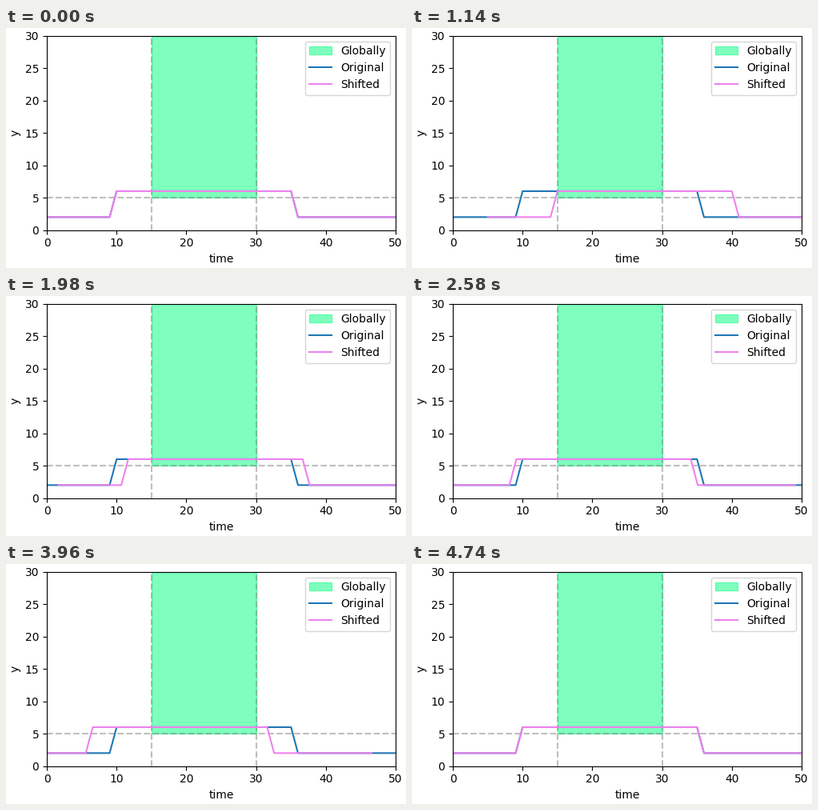
A matplotlib script that plays this animation: 500 by 300 pixels, repeating every 4.8 s.

```python
import numpy as np
import matplotlib.pyplot as plt
from matplotlib.animation import FuncAnimation

INTERVAL = 60

# A trapezoid pulse, and its offset in time for every frame
time = np.array([0, 9, 10, 35, 36, 50])
signal = np.array([2, 2, 6, 6, 2, 2])
shifts = np.concatenate([
    np.linspace(0, 5, 20),
    np.linspace(5, -5, 40),
    np.linspace(-5, 0, 20),
])

fig, ax = plt.subplots(figsize=(5, 3), dpi=100, layout="constrained")

ax.fill_between([15, 30], 5, 30, color="springgreen", alpha=0.5,
                label="Globally")
guide = dict(color="gray", linestyle="--", alpha=0.5)
ax.axhline(5, **guide)
ax.axvline(15, **guide)
ax.axvline(30, **guide)

ax.plot(time, signal, color="tab:blue", label="Original")
shifted, = ax.plot(time, signal, color="violet", label="Shifted")

ax.set(xlim=(0, 50), ylim=(0, 30), xlabel="time", ylabel="y",
       xticks=range(0, 51, 10), yticks=range(0, 31, 5))
ax.legend(loc="upper right")


def update(frame):
    shifted.set_xdata(time + shifts[frame])
    return shifted,


anim = FuncAnimation(fig, update, frames=len(shifts), interval=INTERVAL,
                     repeat=True, repeat_delay=0)
plt.show()
```
